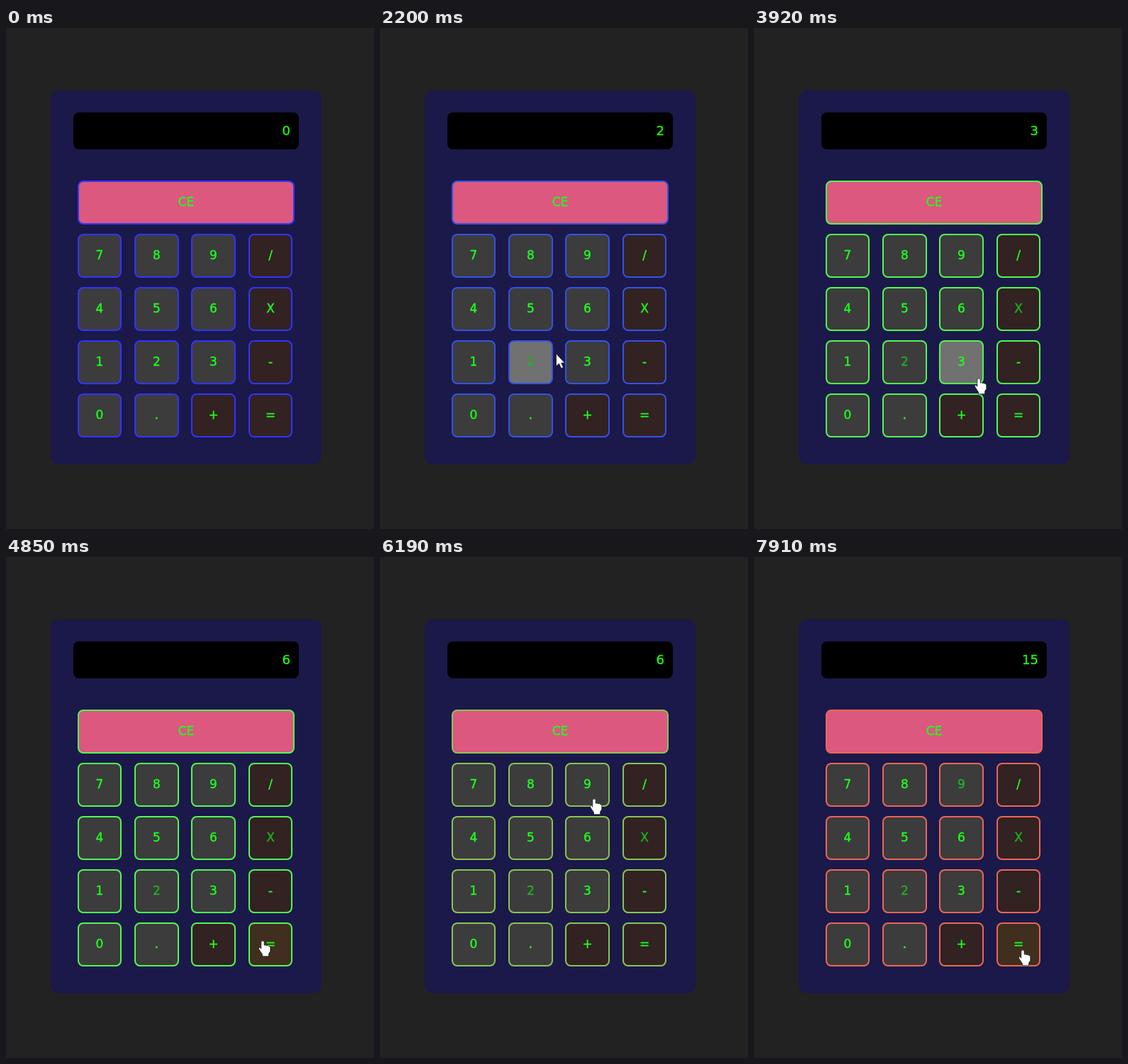
Write an HTML page that moves like this. It is 519 px wide and 706 px high and loops after 8000 ms.

```html
<!DOCTYPE html>
<html lang="en">
<head>
<meta charset="utf-8">
<title>Calculator</title>
<style>
  html, body { margin: 0; width: 100%; height: 100%; overflow: hidden; background: #222; }
  svg { display: block; width: 519px; height: 706px; }
  text { font-family: "DejaVu Sans", sans-serif; text-anchor: middle; fill: #1eff1e; stroke: #1eff1e; stroke-width: .4; }
  .key text { font-size: 17px; }
  .key rect { stroke-width: 2; }
  .key .dim { fill: #22b022; stroke: #22b022; }
  #out { font-size: 18px; text-anchor: end; fill: #1fee14; stroke: #1fee14; stroke-width: .5; }
  #cursor path { fill: #fff; stroke: #111; stroke-width: .7; stroke-linejoin: round; }
</style>
</head>
<body>
<svg viewBox="0 0 519 706">
  <rect width="519" height="706" fill="#222"/>
  <rect x="63" y="88" width="382" height="527" rx="12" fill="#1a194a"/>
  <rect x="95" y="119" width="318" height="52" rx="8"/>
  <text id="out" x="401" y="151">0</text>
  <g id="keys"></g>
  <g id="cursor">
    <path id="arrow" d="M-.5-1V16.5L3.5 13 6.5 19.5 9.5 18.2 6.6 12H11.5Z"/>
    <path id="hand" d="M-2.2 1.2Q0-1.6 2.2 1.2V6.2Q4 5 5.7 6.8 7.5 5.4 8.4 7.6 10.6 6.6 10.8 9.5V14.5L8.6 18V21.8H-.5V19L-4.2 13.4Q-6.6 9.6-4.6 9.2-3.4 9-2.2 11.2Z"/>
  </g>
</svg>
<script>
const LOOP = 8000, STEP = 200 / 3, LAG = 60, ENTER = 1260;
const BLUE = [51, 51, 255], GREEN = [80, 250, 80], RED = [238, 102, 85];
const $ = id => document.getElementById(id);

function node(tag, attrs, parent) {
  const el = document.createElementNS('http://www.w3.org/2000/svg', tag);
  for (const k in attrs) el.setAttribute(k, attrs[k]);
  return parent.appendChild(el);
}

const keys = [];
function addKey(label, left, right, y, fill, hover) {
  const g = node('g', { class: 'key' }, $('keys'));
  const box = node('rect', { x: left + 1, y: y + 1, width: right - left - 2, height: 60, rx: 7, fill }, g);
  const text = node('text', { x: (left + right) / 2, y: y + 36 }, g);
  text.textContent = label;
  keys.push({ label, left, right, y, fill, hover, box, text });
}

addKey('CE', 101, 407, 215, '#dc587f', '#dc587f');
['789/', '456X', '123-', '0.+='].forEach((row, r) => [...row].forEach((c, i) => {
  const left = 100.9 + i * 80.25, digit = /[\d.]/.test(c);
  addKey(c, Math.round(left), Math.round(left + 62.4), 290 + r * 75,
    digit ? '#3c3c3c' : '#322222', digit ? '#717171' : '#402e1e');
}));

// where the cursor rests
const stops = [
  { from: 0, to: ENTER, x: 458, y: 690 },
  { from: 1780, to: 1900, x: 205, y: 480 },
  { from: 2800, to: 3060, x: 376, y: 401 },
  { from: 3500, to: 3716, x: 300, y: 478 },
  { from: 4416, to: 4720, x: 374, y: 546 },
  { from: 5250, to: 5680, x: 311, y: 518 },
  { from: 6280, to: 6390, x: 302, y: 332 },
  { from: 6760, to: 6800, x: 376, y: 540 },
  { from: 7120, to: LOOP, x: 379, y: 554 }
];
const presses = [
  { at: 2130, key: '2', out: '2' },
  { at: 3000, key: 'X', out: '2' },
  { at: 3700, key: '3', out: '3' },
  { at: 4500, key: '=', out: '6' },
  { at: 6260, key: '9', out: '9' },
  { at: 7000, key: '=', out: '15' }
];
const FADING = '2X9';

const clamp = p => Math.min(1, Math.max(0, p));
const mix = (a, b, p) => a.map((v, i) => v + (b[i] - v) * p);
const smooth = p => p * p * (3 - 2 * p);
const easeIn = (t, from, to) => clamp((t - from) / (to - from)) ** 1.8;

function cursorAt(t) {
  const i = stops.findIndex(s => t < s.to);
  const b = stops[i], a = stops[i - 1] || b;
  const p = a === b ? 1 : clamp((t - a.to) / (b.from - a.to));
  return mix([a.x, a.y], [b.x, b.y], smooth(p));
}

function keyAt([x, y]) {
  return keys.find(k => x >= k.left && x <= k.right && y >= k.y && y <= k.y + 62);
}

function borderAt(t) {
  const c = t < 4700 ? mix(BLUE, GREEN, easeIn(t, ENTER, 3933))
                     : mix(GREEN, RED, easeIn(t, 4700, 7350));
  return `rgb(${c.map(Math.round)})`;
}

function draw(time) {
  const t = Math.min(LOOP - 1, Math.floor((time + 24) / STEP) * STEP);
  const pos = cursorAt(t), over = keyAt(pos), lit = keyAt(cursorAt(t - LAG));
  const done = presses.filter(p => t >= p.at);
  const stroke = borderAt(t);

  for (const k of keys) {
    k.box.setAttribute('stroke', stroke);
    k.box.setAttribute('fill', k === lit ? k.hover : k.fill);
    const dim = FADING.includes(k.label) && done.some(p => p.key === k.label);
    k.text.classList.toggle('dim', dim);
  }
  $('out').textContent = done.length ? done[done.length - 1].out : '0';
  $('cursor').setAttribute('transform', `translate(${pos.map(Math.round)})`);
  $('cursor').style.display = t < ENTER ? 'none' : '';
  $('arrow').style.display = over ? 'none' : '';
  $('hand').style.display = over ? '' : 'none';
}

const start = performance.now();
function tick() {
  draw((performance.now() - start) % LOOP);
  requestAnimationFrame(tick);
}
tick();
</script>
</body>
</html>
```
